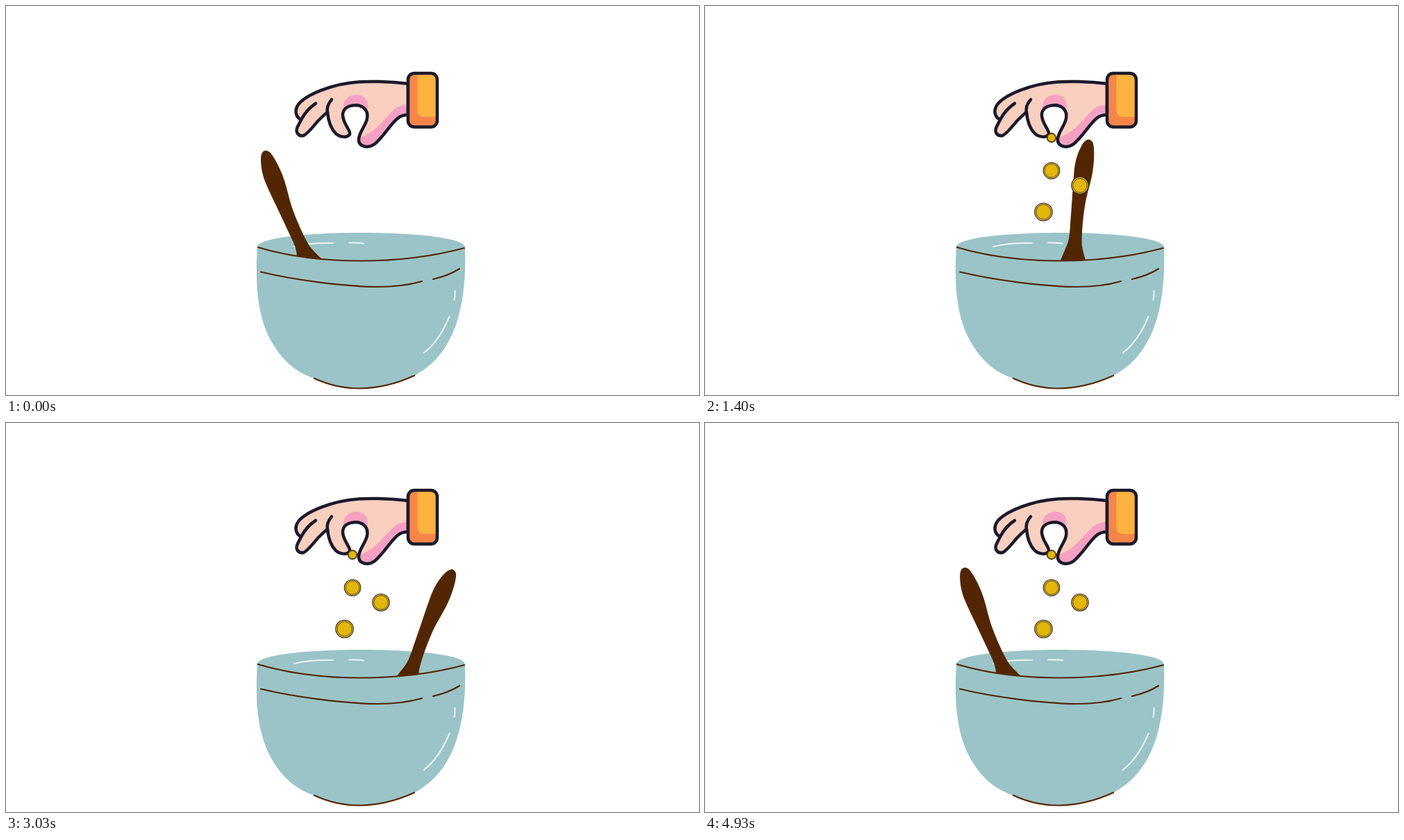
Recreate the animation shown at these times as an HTML page. Size 998 px wide and 561 px high, loop 5.01 s.

```html
<!DOCTYPE html>
<html lang="en">
<head>
<meta charset="utf-8">
<title>Mixing bowl</title>
<style>
  html, body { margin: 0; width: 100%; height: 100%; overflow: hidden; background: #fff; }
  svg { display: block; width: 100%; height: 100%; }
  .line { fill: none; stroke-linecap: round; stroke-linejoin: round; }
  .brown { stroke: #552502; stroke-width: 2.2; }
  .shine { stroke: #e6eff0; stroke-width: 2.2; }
  .ink { stroke: #1a1a2b; stroke-width: 4.5; }
</style>
</head>
<body>
<svg viewBox="0 0 998 561">
  <defs>
    <path id="palm" d="M579 112 C550 108.5 520 108.5 508 109.5 C470 112 432 128 421 142 C415 150 417 160 425 164
      L420 174 C416 182 421 188 428 187 C434 185 443 173 449 166 C455 160 459 156 463 153
      C464 165 468 177 475 184 C482 190 492 190 495 185 C497 179 484 169 485 156
      C486 146 496 143 505 143 C516 144 522 152 520 162 C519 172 507 183 508 194
      C509 203 521 206 531 199 C545 187 553 171 564 162 Q570 157 579 157 Z"/>
    <clipPath id="insidePalm"><use href="#palm"/></clipPath>
    <clipPath id="aboveRim">
      <path d="M0 0 H998 V349 H660 C612 362 560 367.5 510 367.5 C460 367.5 410 362 363 348 H0 Z"/>
    </clipPath>
  </defs>

  <g id="bowl">
    <path fill="#9ac4c7" d="M362 348 C362 320 661 320 661 348 C665 462 630 511 588 533
      Q548 551 509 551.5 Q480 552 444 537 C422 530 402 516 386 490 C364 455 358 410 362 348 Z"/>
    <path class="line shine" d="M415 347 Q440 341 471 342 M494 341.5 Q505 341 515 342.5
      M646.5 411 Q647 418 645.5 424 M638.5 448 Q624 483 602 500"/>
  </g>

  <g clip-path="url(#aboveRim)">
    <path id="spoon" fill="#522602" d="M374 208.5 C369 208.5 367 214 367 222 C367 236 371 249 376 260
      C383 276 397 304 405 322 C412 337 418 347 419 360 L422 388 L466 374
      C455 366 443 354 437 346 C428 331 417 306 411 288 C406 272 404 258 397 241
      C392 229 386 218 381 212 Q378 208.5 374 208.5 Z"/>
  </g>

  <path class="line brown" d="M363 348 C410 362 460 367.5 510 367.5 C560 367.5 612 362 660 349
    M367 383.5 C415 395 485 404.5 535 405 C560 405 582 402 599 397 M615 394 Q637 389 653 379
    M444 537 Q475 551.5 509 551.5 Q549 551 588 533"/>

  <g id="hand">
    <use href="#palm" fill="#f9cfc0"/>
    <g clip-path="url(#insidePalm)" fill="#f6a1c2">
      <path d="M486 150 C484 136 493 128 505 128 C517 128 523 137 520 150 Z"/>
      <path d="M505 190 C530 188 545 160 562 147 Q568 143 579 142 V160 L530 206 H505 Z"/>
    </g>
    <use href="#palm" class="line ink"/>
    <path class="line ink" d="M446 140.5 Q433 149 425 164 M469 135 Q461 144 463 154"/>
    <rect x="579" y="97" width="42" height="77" rx="9" fill="#f58549"/>
    <path fill="#fcb33f" d="M592.5 97 H612 Q621 97 621 106 V160 H602 Q592.5 160 592.5 150 Z"/>
    <rect class="line ink" x="579" y="97" width="42" height="77.5" rx="9"/>
  </g>

  <g id="coins"></g>
</svg>
<script>
  const LOOP = 5010;
  const SWING_START = 30;
  const HALF_SWING = 2470;
  const PIVOT = { x: 475, y: 464.5 };
  const spoon = document.getElementById('spoon');

  const coins = [
    { x: 499, y: 190, r: 7, start: 110 },
    { x: 499, y: 237.5, r: 12.2, start: 300 },
    { x: 540, y: 258.8, r: 12.7, start: 490 },
    { x: 487.5, y: 297, r: 13.2, start: 680 }
  ];

  function addCircle(parent, r, fill, stroke, width) {
    const circle = document.createElementNS('http://www.w3.org/2000/svg', 'circle');
    Object.entries({ r, fill, stroke, 'stroke-width': width })
      .forEach(([name, value]) => circle.setAttribute(name, value));
    parent.append(circle);
  }

  for (const coin of coins) {
    coin.node = document.createElementNS('http://www.w3.org/2000/svg', 'g');
    addCircle(coin.node, coin.r - 0.4, '#c8a64b', '#3d2f16', 1.1);
    addCircle(coin.node, coin.r * 0.8, '#e2b60c', '#54400f', 0.8);
    document.getElementById('coins').append(coin.node);
  }

  const clamp = v => Math.max(0, Math.min(1, v));

  // Ease in and out, between a quadratic and a sine curve.
  function swing(u) {
    const quad = u < 0.5 ? 2 * u * u : 1 - 2 * (1 - u) ** 2;
    const sine = (1 - Math.cos(Math.PI * u)) / 2;
    return 0.6 * quad + 0.4 * sine;
  }

  function draw(t) {
    const phase = (t - SWING_START) / HALF_SWING;
    const p = swing(clamp(1 - Math.abs(1 - phase)));
    spoon.setAttribute('transform',
      `translate(${72 * p} ${2.5 * p}) rotate(${49 * p} ${PIVOT.x} ${PIVOT.y})`);

    for (const { x, y, r, start, node } of coins) {
      const age = t - start;
      const lift = 2.35 * r * (1 - clamp(age / 400)) ** 2;
      node.setAttribute('visibility', age > 0 ? 'visible' : 'hidden');
      node.setAttribute('transform', `translate(${x} ${y - lift}) scale(${clamp(age / 110)})`);
    }
  }

  const began = performance.now();
  function tick() {
    draw((performance.now() - began) % LOOP);
    requestAnimationFrame(tick);
  }
  tick();
</script>
</body>
</html>
```
